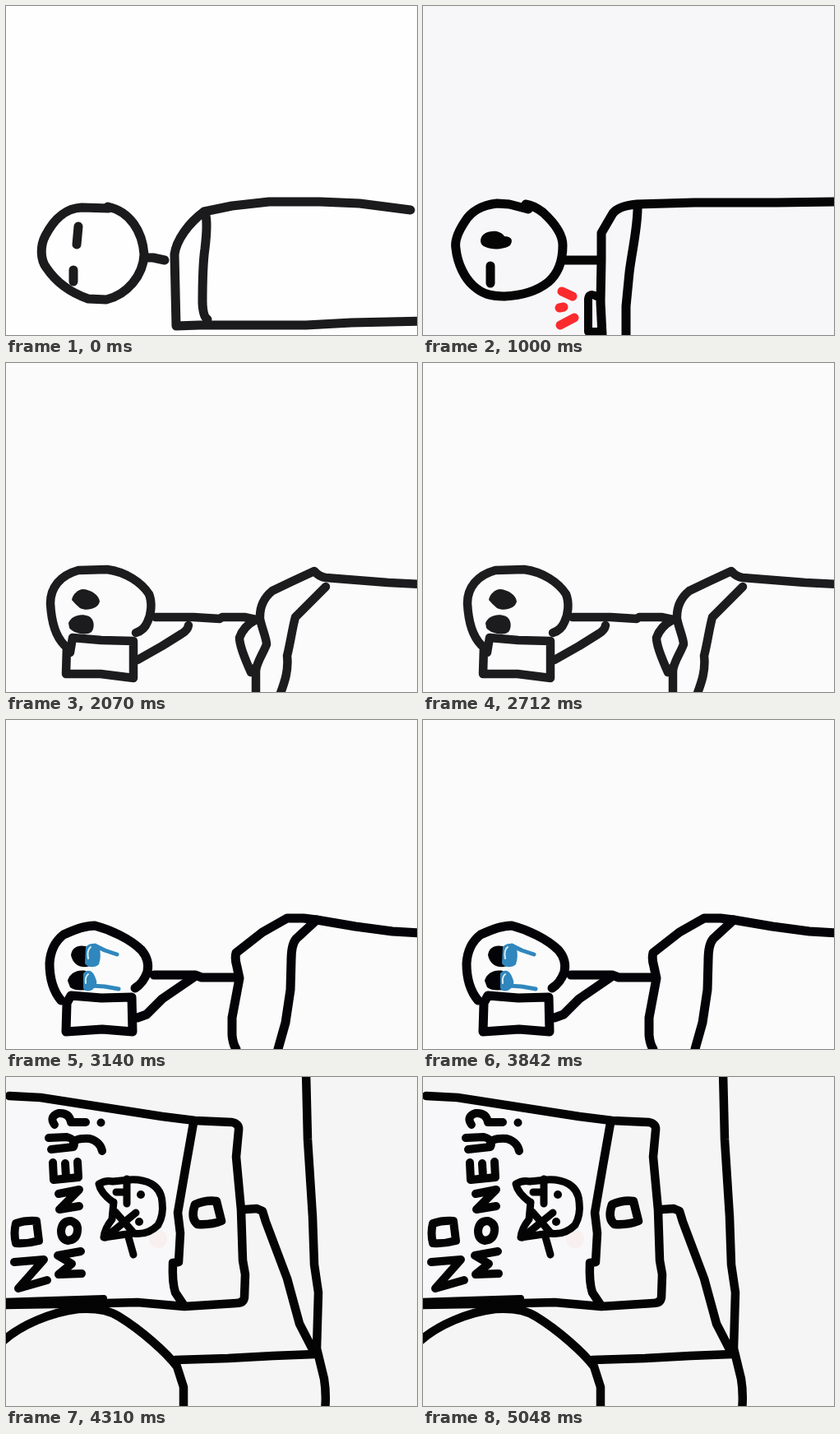
These frames come from a looping animation (500x400 px, 5540 ms). An HTML page:

```html
<!DOCTYPE html>
<html lang="en">
<head>
<meta charset="utf-8">
<title>No money</title>
<style>
html, body { margin: 0; width: 100%; height: 100%; overflow: hidden; background: #fefefe; }
svg { display: block; width: 100vw; height: 100vh; }
g { fill: none; stroke-linecap: round; stroke-linejoin: round; }
</style>
</head>
<body>
<svg id="stage" viewBox="0 0 500 400"></svg>
<script>
const path = (d, attrs = '') => `<path d="${d}" ${attrs}/>`;
const blob = (d) => path(d, 'fill="currentColor" stroke="none"');
const dot = (x, y, r, color = 'currentColor') =>
  `<circle cx="${x}" cy="${y}" r="${r}" fill="${color}" stroke="none"/>`;

const scenes = [
  { // lying awake
    hold: 1000, paper: '#fefefe', ink: '#1b1b1d', width: 11,
    art: [
      path('M125 246L92 245C71 246 58 260 48 279C41 292 42 309 49 318C61 336 80 349 100 356L122 357C147 351 167 328 168 302C166 274 151 250 124 244'),
      path('M88 268L86 290M82 321V335'),
      path('M172 306L179 306L193 309'),
      path('M492 248L430 240L382 238H320L275 243L241 250C222 264 207 285 205 302L207 389L235 388H365L420 385L506 383'),
      path('M243 255C245 264 244 278 242 295C239 315 239 345 239 362Q240 378 245 381')
    ]
  },
  { // phone buzzes
    hold: 1070, paper: '#f7f7fa', ink: '#050505', width: 11,
    art: [
      path('M128 247L105 241L90 240C72 242 58 250 51 262C43 274 38 285 40 295C42 314 51 331 61 340C72 350 82 353 99 353C122 352 138 347 152 336C164 326 170 311 170 291C170 277 158 262 146 251Q134 242 125 241'),
      blob('M70 285C71 276 80 273 90 274Q97 276 99 280C108 280 110 285 106 291C99 296 84 297 76 293Q70 291 70 285Z'),
      path('M82 316V337'),
      path('M171 309H214'),
      path('M506 238L430 239L330 239L260 241Q238 243 231 252L217 276V308L216 360L218 400'),
      path('M261 246C261 270 254 299 251 324L247 365V406'),
      path('M211 353Q202 348 201 356V396H216', 'stroke-width="10"'),
      path('M169 347L182 353M166 367L171 366M167 388L184 379', 'stroke="#fa2a2d"')
    ]
  },
  { // looking at the phone
    hold: 1070, paper: '#fbfbfb', ink: '#1c1c1e', width: 10.5,
    art: [
      path('M71 343C59 331 55 312 54 292C54 273 66 258 88 252L123 251C146 254 165 267 174 281C178 291 177 305 172 315Q168 325 158 328'),
      blob('M80 288C81 281 88 275 94 275C104 276 113 282 114 290C112 299 98 302 90 298Q84 293 80 288Z'),
      blob('M76 316C80 307 91 304 101 308C108 312 108 322 104 327C98 332 82 329 77 322Z'),
      path('M78 352L81 334L116 337L155 338L155 383L115 378L73 378L74 345'),
      path('M182 309H228L260 311L263 309H290L304 312'),
      path('M222 319Q221 325 214 329L190 344L160 361'),
      path('M304 312Q289 320 284 334C284 344 293 365 298 376L304 370'),
      path('M506 269L465 267L389 261Q381 260 375 253L347 266L324 277Q308 290 309 311C312 325 317 335 317 342C313 353 304 365 304 375V406'),
      path('M389 272L352 309C348 324 346 340 342 356C344 374 339 388 333 404')
    ]
  },
  { // crying
    hold: 1170, paper: '#fbfbfb', ink: '#040408', width: 11,
    art: [
      path('M67 341C57 329 53 314 53 296C54 279 61 268 70 261C83 255 95 250 108 250C127 255 151 266 165 280Q175 292 172 306Q167 320 157 326'),
      blob('M79 286C80 277 87 273 97 275L102 279V299C94 302 82 300 79 286Z'),
      blob('M75 317C77 308 87 303 97 305L102 311V327Q86 331 78 325Z'),
      path('M74 344L79 335L116 338L153 337L154 379L117 376L73 379L74 345'),
      path('M180 310H230L238 313H283'),
      path('M228 313L190 339L171 358L160 362'),
      path('M506 259L470 257L425 251L378 243L362 241L342 241L312 258L280 283Q278 290 281 300L284 314L275 362L275 383Q276 394 280 400'),
      path('M378 243L353 266Q347 273 347 292L346 328L340 368L331 400'),
      `<g color="#3087bd" stroke="#3087bd" stroke-width="5">
        ${blob('M97 276C103 269 111 272 114 278Q116 288 113 297C108 302 99 301 96 296Z')}
        ${path('M108 274L120 280L135 285')}
        ${blob('M94 308C99 302 106 304 109 314Q113 322 105 328Q97 332 94 326Z')}
        ${path('M104 323L120 324L137 327')}
      </g>`,
      path('M103 276Q98 280 100 290M100 309Q96 312 97 320', 'stroke="#d8edf7" stroke-width="2"')
    ]
  },
  { // close-up of the screen
    hold: 1230, paper: '#f5f5f5', ink: '#040404', width: 10.5,
    art: [
      path('M-6 23L40 26L230 54L207 225L217 279L120 270L-6 275Z', 'fill="#f8f8fa" stroke="none"'),
      dot(185, 197, 11, '#f8efef'),
      path('M4 23L42 25L100 34L190 48L230 53L275 55Q284 57 283 65L280 97L286 162L288 223L291 240L290 268Q289 275 280 275L217 279L160 274L120 275L-6 277'),
      path('M-6 273L55 271L119 269', 'stroke-width="8"'),
      path('M228 56L219 107L209 165L212 190L210 225L203 226Q202 250 206 262L216 277'),
      path('M230 155Q244 149 256 151L262 175Q250 180 233 179Q224 172 230 155Z'),
      path('M291 161L305 160L312 163L316 176L342 245L357 300L374 333'),
      path('M365 -6L367 76L373 170L375 228L380 262L378 330L387 367Q390 385 388 406'),
      path('M206 344L270 342L325 339L376 337'),
      path('M-6 323C18 301 55 286 88 282Q120 280 137 291C165 308 195 335 208 352L216 377V406'),
      // handwriting, turned to read upwards
      `<g stroke-width="10">
        ${path('M10 225L46 222L15 257L50 247')}
        ${path('M12 178Q24 174 37 175L40 199Q26 203 12 202Q9 190 12 178Z')}
        ${path('M91 212L63 217L80 227L64 240L92 239')}
        ${path('M67 187Q68 175 79 175Q88 178 87 187Q86 198 75 199Q67 197 67 187Z')}
        ${path('M64 142L89 137L65 161L89 157')}
        ${path('M57 104L58 125L88 122L87 103M73 122L72 105')}
        ${path('M52 74L74 73Q86 76 82 85L55 88M82 80Q84 74 102 75Q115 79 117 90')}
        ${path('M59 58Q52 48 64 44Q77 43 79 55L97 55')}
      </g>`,
      dot(115.5, 55.5, 5),
      // cat sticker
      `<g stroke-width="9">
        ${path('M130 152Q115 141 113 130Q121 125 130 127L150 125Q166 124 177 130Q189 137 190 152Q192 168 185 180Q172 193 154 190L119 195Q120 184 129 173L131 152')}
        ${path('M147 124V154M134 140H147')}
        ${path('M133 164L154 188M158 165L121 195M148 191L155 216')}
      </g>`,
      dot(164, 143, 5), dot(162, 176, 5)
    ]
  }
];

const stage = document.getElementById('stage');
stage.innerHTML = scenes.map(({ paper, ink, width, art }) =>
  `<g color="${ink}" stroke="${ink}" stroke-width="${width}" display="none">
    <rect width="500" height="400" fill="${paper}" stroke="none"/>${art.join('')}
  </g>`).join('');

const layers = [...stage.children];
const loop = scenes.reduce((sum, scene) => sum + scene.hold, 0);

function sceneAt(time) {
  let rest = time % loop;
  return scenes.findIndex(({ hold }) => (rest -= hold) < 0);
}

function draw() {
  const current = sceneAt(performance.now());
  layers.forEach((layer, i) => layer.setAttribute('display', i === current ? 'inline' : 'none'));
  requestAnimationFrame(draw);
}
draw();
</script>
</body>
</html>
```
